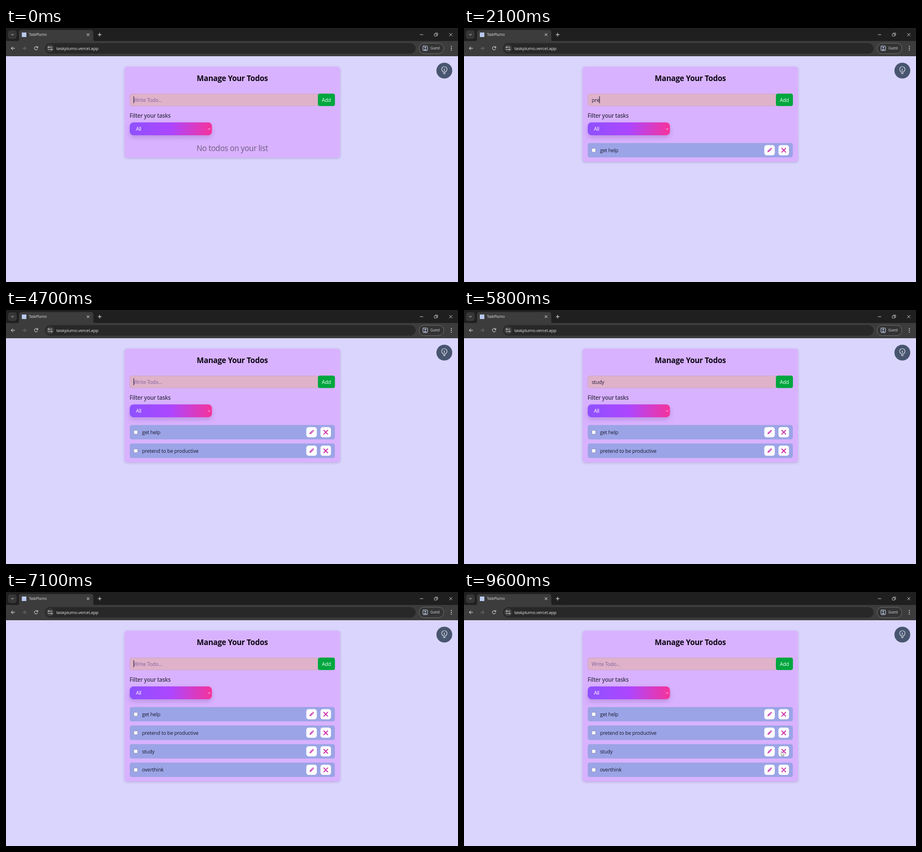
Animation of 800 by 450 pixels, one loop 9.7 s. Source, as an HTML page:

```html
<!DOCTYPE html>
<html lang="en">
<head>
<meta charset="utf-8">
<title>TaskPlumo</title>
<style>
  html, body { margin: 0; width: 100%; height: 100%; overflow: hidden; background: #dad5fd; }
  svg { display: block; width: 800px; height: 450px; }
  text { font: 9px "Open Sans", "Noto Sans", sans-serif; letter-spacing: -0.02em; white-space: pre; }
  .line { fill: none; stroke-linecap: round; stroke-linejoin: round; }
  #card { filter: drop-shadow(0 1px 2px rgba(40, 20, 80, .22)); }
  #select { filter: drop-shadow(0 4px 4px rgba(60, 20, 110, .2)); }
</style>
</head>
<body>
<svg viewBox="0 0 800 450">
  <defs>
    <linearGradient id="fade">
      <stop offset="0" stop-color="#8e51ff"/>
      <stop offset=".5" stop-color="#ad46ff"/>
      <stop offset="1" stop-color="#f6339a"/>
    </linearGradient>
    <linearGradient id="ink">
      <stop offset="0" stop-color="#ad35c0"/>
      <stop offset="1" stop-color="#e02a94"/>
    </linearGradient>
    <g id="row">
      <rect x="219" width="363" height="25.6" rx="4" fill="#9ba4e6"/>
      <rect x="226.3" y="9.6" width="6.6" height="6.6" rx="1.2" fill="#fff" stroke="#777b96" stroke-width=".6"/>
      <rect x="531.5" y="3.8" width="18.6" height="18" rx="4.2" fill="#fff"/>
      <rect x="556.6" y="3.8" width="18.6" height="18" rx="4.2" fill="#fff"/>
      <g transform="translate(540.8 12.8) rotate(45)" fill="url(#ink)">
        <rect x="-1.4" y="-4.9" width="2.8" height="1.7" rx=".6"/>
        <path d="M-1.4-2.6H1.4V2.6L0 5.2L-1.4 2.6Z"/>
        <path d="M0-1.4V1.8" stroke="#fff" stroke-width=".6"/>
      </g>
      <path class="line" d="M562.5 9.5L569.3 16.3M569.3 9.5L562.5 16.3" stroke="#cb2aa6" stroke-width="1.7"/>
    </g>
  </defs>

  <rect width="800" height="450" fill="#dad5fd"/>

  <!-- browser frame -->
  <rect width="800" height="24" fill="#1f1f1f"/>
  <rect y="23" width="800" height="27" fill="#3c3c3c"/>
  <path d="M19 23.5Q23 23.5 23 19.5V8Q23 3.5 27.5 3.5H150Q154.500 3.500 154.500 8V19.500Q154.500 23.500 158.500 23.500Z" fill="#3c3c3c"/>
  <rect x="3.500" y="4" width="15.500" height="15.500" rx="4.500" fill="#363636"/>
  <rect x="28" y="8" width="8" height="8" fill="#b9c9ee"/>
  <text x="40.500" y="14.200" fill="#dedede" style="font-size:6.500px">TaskPlumo</text>
  <g class="line" stroke="#dedede" stroke-width="1">
    <path d="M9.500 10.900L11.400 12.800L13.300 10.900"/>
    <path d="M143.300 9.800L147.300 13.800M147.300 9.800L143.300 13.800"/>
    <path d="M163 11.800H168.600M165.800 9V14.600"/>
    <path d="M733 11.800H738" stroke-width=".8"/>
    <path d="M758.500 10.300H762.500V14.300H758.500ZM760 10V8.900H764V12.900H762.900" stroke-width=".7"/>
    <path d="M784.800 9.400L789.600 14.200M789.600 9.400L784.800 14.200" stroke-width=".8"/>
    <path d="M15.300 36H9.300M12 33.300L9.300 36L12 38.700"/>
    <path d="M29.500 36H35.500M32.800 33.300L35.500 36L32.800 38.700" stroke="#777"/>
    <path d="M55.800 34.200A3 3 0 1 0 56.100 36.800M56.200 32.600V34.600H54.200"/>
  </g>
  <rect x="69" y="26.800" width="656" height="18.800" rx="9.400" fill="#282828"/>
  <circle cx="78" cy="36" r="7" fill="#3c3c3c"/>
  <g class="line" stroke="#dedede" stroke-width=".9">
    <path d="M77.700 34H81.500M74.500 38H78.300"/>
    <circle cx="75.400" cy="34" r="1.100"/>
    <circle cx="80.600" cy="38" r="1.100"/>
  </g>
  <text x="89" y="38.900" fill="#e6e6e6" style="font-size:7.800px">taskplumo.vercel.app</text>
  <rect x="731" y="27" width="44" height="18.400" rx="9.200" fill="#333" stroke="#777" stroke-width=".8"/>
  <rect class="line" x="738" y="32" width="8" height="8" rx="1" stroke="#c9d4f4"/>
  <circle cx="742" cy="34.800" r="1.300" fill="#c9d4f4"/>
  <path d="M739.500 39Q742 35.700 744.500 39Z" fill="#c9d4f4"/>
  <text x="751" y="38.400" fill="#cfd3dc" style="font-size:6.400px">Guest</text>
  <g fill="#dedede">
    <circle cx="788.300" cy="32.700" r=".9"/>
    <circle cx="788.300" cy="36" r=".9"/>
    <circle cx="788.300" cy="39.300" r=".9"/>
  </g>

  <!-- theme button -->
  <circle cx="775.800" cy="75.500" r="14" fill="#48556f"/>
  <g class="line" stroke="#eef0f6" stroke-width="1.100">
    <path d="M773.800 78.300Q773.800 77.400 772.400 76.400A4.700 4.700 0 1 1 779.200 76.400Q777.800 77.400 777.800 78.300Z"/>
    <path d="M774.300 80.600H777.300M775.800 72.300V75.800"/>
  </g>

  <!-- todo card -->
  <rect id="card" x="210" y="68.700" width="381" height="161" rx="4.500" fill="#d9b2ff"/>
  <text x="400.500" y="94.400" text-anchor="middle" fill="#0d0713" style="font-size:13.500px;font-weight:700">Manage Your Todos</text>
  <rect x="219.200" y="116.700" width="335" height="21.400" rx="4" fill="#dfb2c9" stroke="#c9a2c2" stroke-width=".7"/>
  <text id="field" x="226" y="130.500"></text>
  <rect id="caret" y="121" width="1" height="12.300" fill="#1c1830"/>
  <rect x="552" y="116.300" width="30.200" height="22" rx="3.600" fill="#00a63e"/>
  <text x="567.100" y="130.600" text-anchor="middle" fill="#f2fff5" style="font-size:8.900px">Add</text>
  <text x="218.800" y="159" fill="#3c3650" style="font-size:9.800px;font-weight:600">Filter your tasks</text>
  <rect id="select" x="219" y="167.300" width="145.500" height="22.700" rx="6.500" fill="url(#fade)"/>
  <text x="230" y="182.200" fill="#fff">All</text>
  <path class="line" d="M358.100 178.500L359.600 179.700L361.100 178.500" stroke="#fff" stroke-width=".9"/>
  <text id="empty" x="400.500" y="217.900" text-anchor="middle" fill="#6b5a80" style="font-size:13.600px">No todos on your list</text>
  <g id="rows"></g>
  <path id="mouse" d="M0 0V8.200L1.900 6.500L3.200 9.300L4.500 8.700L3.200 6H5.700Z" fill="#fff" stroke="#555" stroke-width=".6"/>
</svg>
<script>
  const LOOP = 9700, BLINK = 530, PITCH = 32.85;
  // start: first key, gap: time per key, enter: submit
  const todos = [
    { text: "get help", start: 560, gap: 106, enter: 1500 },
    { text: "pretend to be productive", start: 1870, gap: 105, enter: 4500 },
    { text: "study", start: 4810, gap: 100, enter: 5900 },
    { text: "overthink", start: 6030, gap: 95, enter: 6930 }
  ];
  const el = id => document.getElementById(id);
  const NS = "http://www.w3.org/2000/svg";

  function make(name, attrs, parent) {
    const node = document.createElementNS(NS, name);
    for (const key in attrs) node.setAttribute(key, attrs[key]);
    return parent.appendChild(node);
  }

  const show = (node, on) => node.setAttribute("visibility", on ? "visible" : "hidden");

  const rows = todos.map((todo, i) => {
    const g = make("g", { transform: `translate(0 ${203.7 + i * PITCH})` }, el("rows"));
    make("use", { href: "#row" }, g);
    make("text", { x: 240.7, y: 16.2, fill: "#1b1b2e" }, g).textContent = todo.text;
    return g;
  });

  function draw(t) {
    let typed = "", lastKey = 0, count = 0;
    for (const { text, start, gap, enter } of todos) {
      if (t < start) break;
      const n = Math.min(text.length, Math.floor((t - start) / gap) + 1);
      typed = text.slice(0, n);
      lastKey = start + (n - 1) * gap;
      if (t >= enter) {
        typed = "";
        lastKey = enter;
        count++;
      }
    }

    rows.forEach((row, i) => show(row, i < count));
    show(el("empty"), !count);
    el("card").setAttribute("height", count ? 168.3 + (count - 1) * PITCH : 161);

    const field = el("field");
    field.textContent = typed || "Write Todo...";
    field.setAttribute("fill", typed ? "#211b3a" : "#8262a3");
    el("caret").setAttribute("x", typed ? 225.8 + field.getComputedTextLength() : 225.6);
    show(el("caret"), Math.floor((t - lastKey) / BLINK) % 2 === 0);

    const p = Math.min(1, Math.max(0, (t - 9300) / 300));
    const ease = 1 - (1 - p) ** 2;
    show(el("mouse"), t >= 9300);
    el("mouse").setAttribute("transform", `translate(${563.5 - 2 * ease} ${308 - 25.5 * ease})`);
  }

  const begin = performance.now();
  function tick() {
    const t = (performance.now() - begin) % LOOP;
    draw(Math.floor(t / 100) * 100);
    requestAnimationFrame(tick);
  }
  tick();
</script>
</body>
</html>
```
